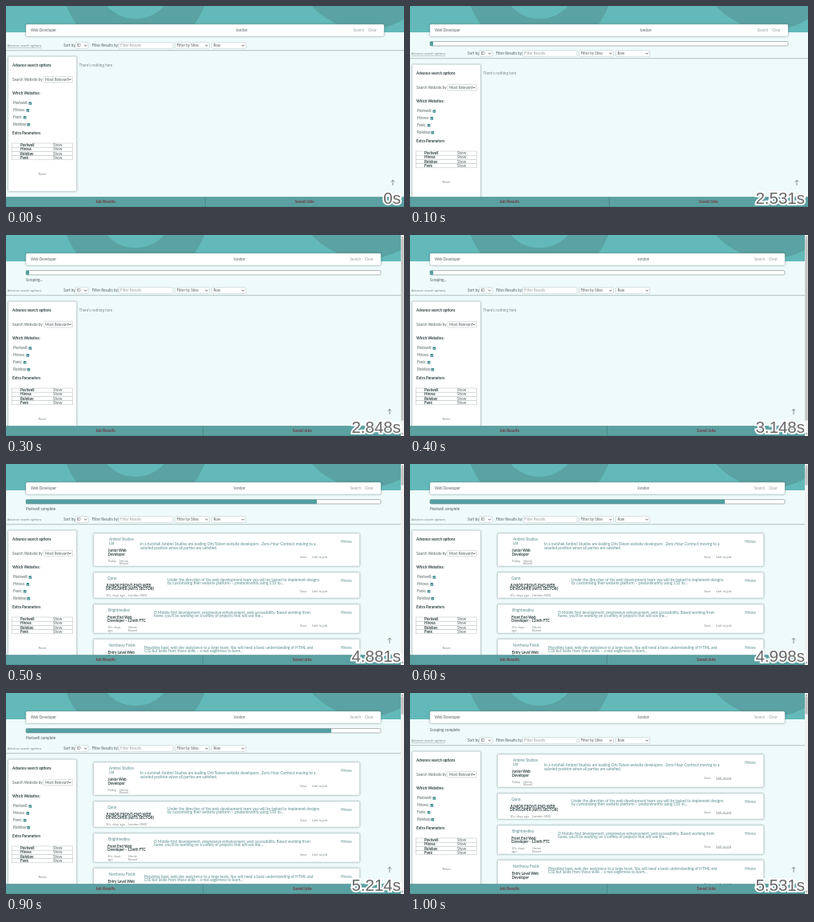
Write an HTML page that moves like this. It is 498x252 px and loops after 1.1 s.

```html
<!DOCTYPE html>
<html lang="en">
<head>
<meta charset="utf-8">
<title>Job search</title>
<style>
html, body { margin: 0; width: 100%; height: 100%; overflow: hidden; background: #effbfb; }
body { position: relative; animation: page 1100ms step-end infinite; }

/* One timeline holds the whole page state; the parts below read it. */
@keyframes page {
  0% {
    --drop: 0px; --gut: 0px; --fill: 4px; --thumb: 0px; --line: underline;
    --bar: hidden; --empty: visible; --results: hidden; --scroll: hidden;
    --status: ""; --time: "0s";
  }
  9.09% {
    --drop: 10px; --gut: 0px; --fill: 4px; --thumb: 0px; --line: underline;
    --bar: visible; --empty: visible; --results: hidden; --scroll: hidden;
    --status: ""; --time: "2.531s";
  }
  18.18% {
    --drop: 10px; --gut: 0px; --fill: 4px; --thumb: 0px; --line: underline;
    --bar: visible; --empty: visible; --results: hidden; --scroll: hidden;
    --status: ""; --time: "2.565s";
  }
  27.27% {
    --drop: 20px; --gut: 4px; --fill: 4px; --thumb: 228px; --line: none;
    --bar: visible; --empty: visible; --results: hidden; --scroll: visible;
    --status: "Scraping..."; --time: "2.848s";
  }
  36.36% {
    --drop: 20px; --gut: 4px; --fill: 4px; --thumb: 228px; --line: none;
    --bar: visible; --empty: visible; --results: hidden; --scroll: visible;
    --status: "Scraping..."; --time: "3.148s";
  }
  45.45% {
    --drop: 20px; --gut: 4px; --fill: 364px; --thumb: 22px; --line: none;
    --bar: visible; --empty: hidden; --results: visible; --scroll: visible;
    --status: "Postwell complete"; --time: "4.881s";
  }
  54.54% {
    --drop: 20px; --gut: 4px; --fill: 369px; --thumb: 22px; --line: none;
    --bar: visible; --empty: hidden; --results: visible; --scroll: visible;
    --status: "Postwell complete"; --time: "4.998s";
  }
  63.63% {
    --drop: 20px; --gut: 4px; --fill: 373px; --thumb: 22px; --line: none;
    --bar: visible; --empty: hidden; --results: visible; --scroll: visible;
    --status: "Postwell complete"; --time: "5.098s";
  }
  72.72% {
    --drop: 20px; --gut: 4px; --fill: 377px; --thumb: 22px; --line: none;
    --bar: visible; --empty: hidden; --results: visible; --scroll: visible;
    --status: "Postwell complete"; --time: "5.198s";
  }
  81.81% {
    --drop: 20px; --gut: 4px; --fill: 382px; --thumb: 22px; --line: none;
    --bar: visible; --empty: hidden; --results: visible; --scroll: visible;
    --status: "Postwell complete"; --time: "5.214s";
  }
  90.9%, 100% {
    --drop: 10px; --gut: 4px; --fill: 4px; --thumb: 22px; --line: underline;
    --bar: hidden; --empty: hidden; --results: visible; --scroll: visible;
    --status: "Scraping complete"; --time: "5.531s";
  }
}

svg { position: absolute; left: 0; top: 0; display: block; }
text, #status { font: 4.65px Lato, "Open Sans", sans-serif; fill: #566262; }
.content { transform: translateY(var(--drop)); }
.right { transform: translateX(calc(-1 * var(--gut))); }
.mid { transform: translateX(calc(-.7 * var(--gut))); }
.search { width: calc(448px - var(--gut)); }
.fill { width: var(--fill); }
.bar { visibility: var(--bar); }
.empty { visibility: var(--empty); }
.results { visibility: var(--results); }
.scroll { visibility: var(--scroll); }
.thumb { height: var(--thumb); }
.card { fill: #fff; stroke: #b5cdce; stroke-width: .5; filter: drop-shadow(.4px .7px .8px #0005); }
.field { fill: #fff; stroke: #b4bebe; stroke-width: .5; }

.b { font-weight: 700; font-size: 4.6px; fill: #2f4040; }
.pale { fill: #98a0a0; }
.dim { fill: #7f8b8b; }
.small { font-size: 4.1px; fill: #7c8787; }
.teal { fill: #568c8d; }
.desc { font-size: 4.8px; fill: #568c8d; }
.link { text-decoration: var(--line); }
.tab { font-weight: 700; font-size: 4.9px; fill: #74383f; text-anchor: middle; }

#status { position: absolute; left: 25px; top: 33.1px; line-height: 6px; color: #4f5c5c;
  white-space: nowrap; transform: translateY(var(--drop)); }
#status::after { content: var(--status); }
#time { position: absolute; right: 4px; top: 228.5px; width: 80px; height: 24px;
  font: 20.5px/24px "Liberation Sans", Arial, sans-serif; color: #666; }
#time::before, #time::after { content: var(--time); position: absolute; right: 0; top: 0; }
#time::before { -webkit-text-stroke: 4px #fff; color: #fff; text-shadow: 0 0 2px #fff; }
</style>
</head>
<body>
<svg id="stage" width="498" height="252" viewBox="0 0 498 252"></svg>
<div id="status"></div>
<div id="time"></div>
<script>
const sites = ["Postwell", "Hirova", "Rolebay", "Fenk"];

const text = (x, y, s, cls = "") => `<text x="${x}" y="${y}" class="${cls}">${s}</text>`;
const lines = (x, y, list, cls, gap = 4.6) =>
  list.map((s, i) => text(x, y + i * gap, s, cls)).join("");
const rect = (x, y, w, h, attrs) =>
  `<rect x="${x}" y="${y}" width="${w}" height="${h}" ${attrs}/>`;
const group = (cls, ...parts) => `<g class="${cls}">${parts.join("")}</g>`;
const stroke = (d, color = "#555", w = .7) =>
  `<path d="${d}" fill="none" stroke="${color}" stroke-width="${w}"/>`;

const select = (x, y, w, label) =>
  rect(x, y, w, 7.6, 'class="field" rx=".8"') + text(x + 2, y + 5.3, label) +
  stroke(`M${x + w - 5} ${y + 3} l1.5 1.7 l1.5 -1.7`, "#333");

const check = (x, y) =>
  rect(x, y, 3.6, 3.6, 'rx=".6" fill="#35868c"') +
  stroke(`M${x + .8} ${y + 1.8} l.8 .9 l1.3 -1.7`, "#fff", .6);

const header =
  rect(0, 0, 498, 33, 'fill="#63b9b9"') +
  `<svg width="498" height="33">
    <circle cx="162" cy="-32" r="70" fill="none" stroke="#5aa2a3" stroke-width="44"/>
    <circle cx="450" cy="-60" r="90" fill="#5aa2a3"/>
  </svg>` +
  rect(25, 23, 448, 15, 'class="card search" rx="1.5"') +
  text(31, 32, "Web Developer") +
  group("mid", text(288, 32, "london")) +
  group("right", text(434.5, 32, "Search", "pale"), text(453, 32, "Clear", "pale"));

const progress = group("bar",
  rect(25, 44.6, 448, 5.4, 'class="search" rx="1.5" fill="#fff" stroke="#8d9696" stroke-width=".7"'),
  rect(25, 44.6, 4, 5.4, 'class="fill" rx="1" fill="#559fa0"'));

const toolbar =
  text(1.5, 51, "Advance search options", "small link") +
  text(72, 51, "Sort by:") + select(86.8, 45.7, 16.2, "ID") +
  text(107.5, 51, "Filter Results by:") +
  rect(141.2, 45.7, 67.8, 7.6, 'class="field" rx=".8"') + text(143, 51, "Filter Results", "pale") +
  select(211.5, 45.7, 43, "Filter by Sites") + select(257.5, 45.7, 42.5, "Row") +
  stroke("M0 55.7 H498", "#8b9898", .6);

const boxes = [["Postwell", 28.5], ["Hirova", 25.5], ["Fenk", 21.8], ["Rolebay", 26.5]];
const panel =
  rect(2.7, 63.3, 85.6, 169, 'class="card" rx="1"') +
  text(8, 76, "Advance search options", "b") +
  text(8, 94, "Search Website by") + select(47, 88.3, 36.5, "Most Relevant") +
  text(8, 111, "Which Websites:", "b") +
  boxes.map(([s, x], i) => text(9, 123.4 + i * 8.9, s + ":") + check(x, 120.2 + i * 8.9)).join("") +
  text(8, 160.7, "Extra Parameters", "b") +
  sites.map((s, i) => {
    const y = 172 + i * 5.2;
    return rect(7.7, y, 76, 5.2, 'class="field"') +
      text(18, y + 4.1, s, "b") + text(59, y + 4.1, "Show");
  }).join("") +
  text(40.5, 212, "Reset", "small");

// y and h place the card; the other offsets are measured from its top
const jobs = [
  { y: 67, h: 41, firm: ["Ambrel Studios", "Ltd"], fx: 129, title: ["Junior Web", "Developer"], ty: 23, tx: 127.5,
    when: ["Today"], where: ["Home", "Based"], wx: 142, wy: 35.6, dx: 168, dy: 15, save: 30.5,
    desc: ["In a nutshell Ambrel Studios are leading Orb Talven website developers . Zero-Hour Contract moving to a",
      "salaried position when all parties are satisfied."] },
  { y: 116, h: 32, firm: ["Quno"], fx: 127, title: ["JUNIOR FRONT-END WEB", "DEVELOPER (ARTS SECTOR)"], ty: 17.6, tx: 125,
    when: ["10+ days ago"], where: ["London SW2"], wx: 153, wy: 29.5, dx: 202, dy: 10.5, save: 24.5,
    desc: ["Under the direction of the web development team you will be tasked to implement designs",
      "by customising their website platform – predominantly using CSS to..."] },
  { y: 156, h: 36, firm: ["Brightmedley"], fx: 128, title: ["Front End Web", "Developer - 12mth FTC"], ty: 17.5, tx: 127,
    when: ["10+ days", "ago"], where: ["Home", "Based"], wx: 153, wy: 30, dx: 185, dy: 11.6, save: 27.5,
    desc: ["O Mobile first development, progressive enhancement, web accessibility. Based working from",
      "home, you'll be working on a variety of projects that will see the..."] },
  { y: 199.5, h: 41, firm: ["Northway Fields"], fx: 128.5, title: ["Entry Level Web", "Developer"], ty: 18.5, tx: 127.5,
    when: [], where: [], wx: 142, wy: 36, dx: 173, dy: 12, save: 31,
    desc: ["Providing basic web dev assistance to a large team. You will need a basic understanding of HTML and",
      "CSS but aside from those skills – a real eagerness to learn..."] },
];

const card = j =>
  rect(109.5, j.y, 333, j.h, 'class="card" rx="1"') +
  lines(j.fx, j.y + 9.3, j.firm, "teal") +
  lines(j.tx, j.y + j.ty, j.title, "b") +
  lines(j.tx, j.y + j.wy, j.when, "small", 3.6) +
  lines(j.wx, j.y + j.wy, j.where, "small", 3.6) +
  lines(j.dx, j.y + j.dy, j.desc, "desc") +
  text(419, j.y + 12, "Hirova", "teal") +
  text(368, j.y + j.save, "Save", "small") +
  text(383, j.y + j.save, "Link to job", "small link");

const footer =
  rect(0, 239.5, 498, 12.5, 'fill="#5ba1a2"') +
  stroke("M0 239.8 H498 M0 251.7 H498", "#4b8586", .6) +
  group("mid", stroke("M249.3 239.5 V252", "#477f80"), text(373.5, 247, "Saved Jobs", "tab")) +
  text(124.5, 247, "Job Results", "tab");

const scrollbar = group("scroll",
  rect(494, 0, 4, 252, 'fill="#f1f1f1"'),
  rect(494.4, 4.5, 3.2, 22, 'class="thumb" fill="#c1c1c1"'),
  '<path d="M494.8 3.4 l1.2 -1.6 l1.2 1.6z M494.8 248.6 l1.2 1.6 l1.2 -1.6z" fill="#777"/>');

document.getElementById("stage").innerHTML =
  header + progress +
  group("content", toolbar, panel,
    group("empty", text(91.5, 76, "There's nothing here", "dim")),
    group("results", ...jobs.map(card))) +
  group("right", stroke("M484 225 V218.3 M481.8 220.6 L484 218.3 L486.2 220.6", "#566")) +
  footer + scrollbar;
</script>
</body>
</html>
```
